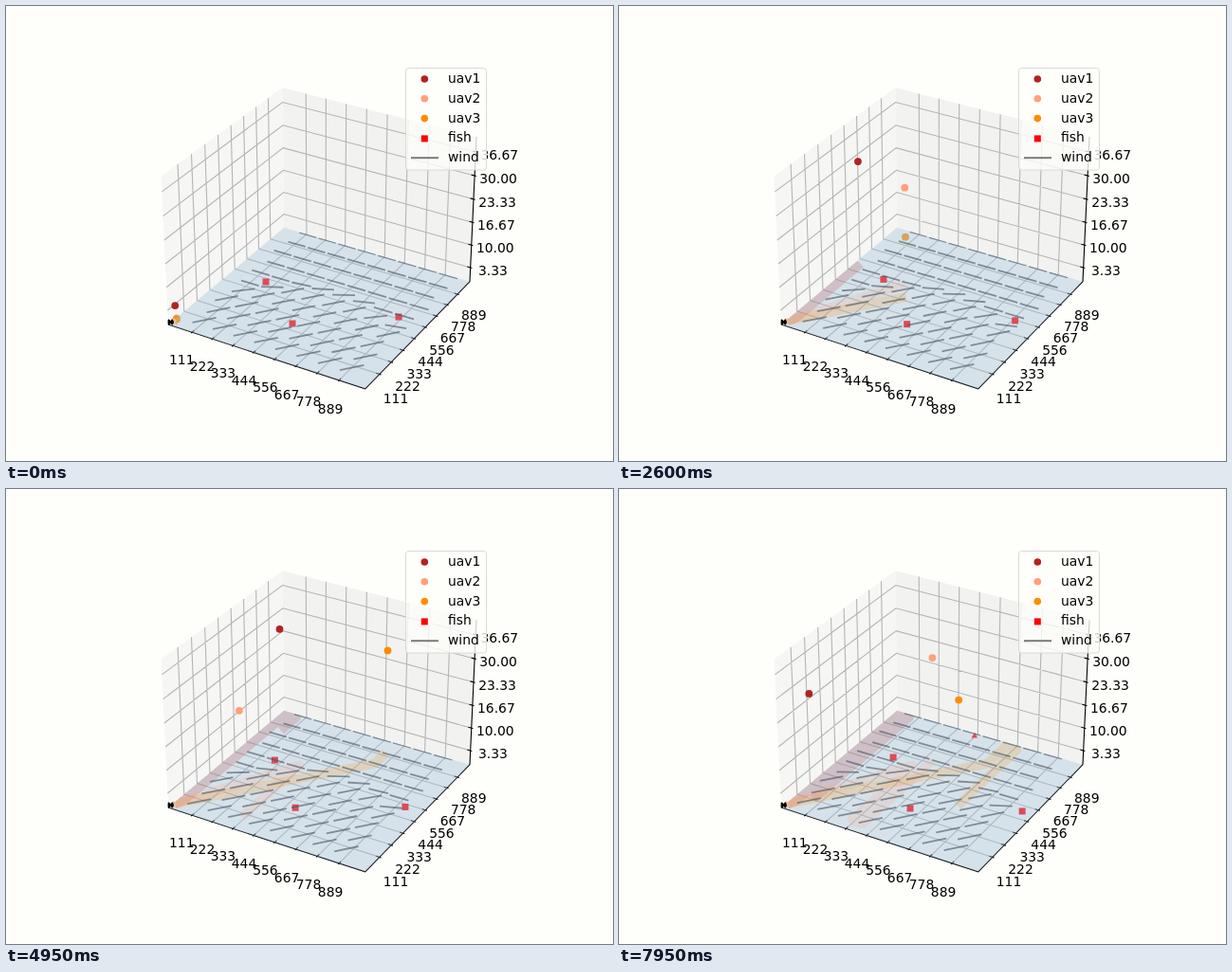
These frames come from a looping animation (640x480 px, 8 s). An HTML page:

```html
<!DOCTYPE html>
<html lang="en">
<head>
<meta charset="utf-8">
<title>Survey flight</title>
<style>
html, body { margin: 0; width: 100%; height: 100%; overflow: hidden; background: #fefefb; }
svg { display: block; width: 640px; height: 480px; }
text { font: 13.89px "DejaVu Sans", sans-serif; fill: #000; }
</style>
</head>
<body>
<svg id="stage" viewBox="0 0 640 480" xmlns="http://www.w3.org/2000/svg"></svg>
<script>
const LOOP = 8000, STEP = 50;
const LO = -1 / 48, HI = 49 / 48;
const SPEED = 0.243, HEIGHT = 0.75, LANE = 0.06, MARGIN = 0.03;

// Each drone climbs to a point on its lane, then sweeps up and down the field
const uavs = [
  { color: '#b22222', x: 0.02, y: 0.047, climb: 0.35, far: true },
  { color: '#ffa07a', x: 0.33, y: 0.589, climb: 2.83, far: false },
  { color: '#ff8c00', x: 0.632, y: 0.778, climb: 4.54, far: true }
];
// Screen position and drift per second
const fish = [
  { x: 274, y: 291, vx: 1.9, vy: -1 },
  { x: 302, y: 335, vx: 0.63, vy: 0.25 },
  { x: 414, y: 328, vx: 1.4, vy: 1.5 }
];

// Perspective view: elevation 30, azimuth -60; data ranges run 0..1
function project(fx, fy, fz) {
  const x = (fx - 0.5) * 8 / 7, y = (fy - 0.5) * 8 / 7, z = (fz - 0.5) * 6 / 7;
  const right = 0.866 * x + 0.5 * y;
  const up = -0.25 * x + 0.433 * y + 0.866 * z;
  const depth = 10 - (0.433 * x - 0.75 * y + 0.5 * z);
  return [333 + 1997.8 * right / depth, 237.4 - 1997.8 * up / depth];
}

const fmt = p => p.map(v => v.toFixed(2)).join(',');
const path3 = (...pts) => 'M' + pts.map(p => fmt(project(...p))).join('L');
const mix = (a, b, k) => a + (b - a) * k;
const clamp = v => Math.min(1, Math.max(0, v));

function flight({ x, y, climb, far }, sec) {
  const k = sec / climb;
  if (k < 1) return [x * k, y * k, HEIGHT * k];
  const end = far ? 1 - MARGIN : MARGIN, dir = far ? 1 : -1;
  const run = Math.abs(end - y), dist = SPEED * (sec - climb);
  const across = Math.min(LANE, Math.max(0, dist - run));
  const back = Math.max(0, dist - run - LANE);
  return [x + across, y + dir * (Math.min(dist, run) - back), HEIGHT];
}

function trackPath(uav, sec) {
  const pts = [];
  for (let s = 0; s < sec; s += 0.1) pts.push(flight(uav, s));
  pts.push(flight(uav, sec));
  return path3(...pts.map(([x, y]) => [x, y, 0]));
}

function windPath(sec) {
  let d = '';
  for (let row = 0; row < 10; row++) {
    const y = 0.03 + row * 0.107;
    const shift = 0.08 + 0.014 * Math.sin(row * 2.4) - 0.0057 * sec;
    for (let col = 0; col < 9; col++) {
      const x = shift + col * 0.112;
      if (x > 0.9) continue;
      const edge = 0.32 + 0.25 * Math.sin(Math.PI * x);
      const calm = clamp((y - edge) / 0.12 + 0.5);
      const angle = mix(0.88, 0.02, calm), len = mix(0.115, 0.098, calm);
      d += path3([x, y, 0], [x + len * Math.cos(angle), y + len * Math.sin(angle), 0]);
    }
  }
  return d;
}

function buildAxes() {
  let grid = '', ticks = '', labels = '';
  const label = (p, dx, dy, s) => {
    labels += `<text x="${(p[0] + dx).toFixed(1)}" y="${(p[1] + dy + 5).toFixed(1)}" text-anchor="middle">${s}</text>`;
  };
  for (let i = 1; i < 9; i++) {
    const f = i / 9, s = Math.round(f * 1000);
    grid += path3([f, LO, LO], [f, HI, LO], [f, HI, HI]);
    grid += path3([HI, f, LO], [LO, f, LO], [LO, f, HI]);
    ticks += path3([f, LO - 0.0083, LO], [f, LO + 0.0167, LO]);
    ticks += path3([HI + 0.0083, f, LO], [HI - 0.0167, f, LO]);
    label(project(f, LO, LO), mix(-11.2, -8.8, f), mix(28.4, 30, f), s);
    label(project(HI, f, LO), 17.2, mix(26, 22, f), s);
  }
  for (let i = 0; i < 6; i++) {
    const f = (i + 0.5) / 6;
    grid += path3([LO, LO, f], [LO, HI, f], [HI, HI, f]);
    ticks += path3([HI + 0.0083, HI, f], [HI - 0.0167, HI, f]);
    label(project(HI, HI, f), i ? 25 : 23.7, 2.7, (f * 40).toFixed(2));
  }
  const axes = path3([LO, LO, LO], [HI, LO, LO], [HI, HI, LO], [HI, HI, HI]);
  return { grid, lines: axes + ticks, labels };
}

function buildLegend() {
  const marks = [
    ...uavs.map(u => y => `<circle cx="441.3" cy="${y}" r="3.8" fill="${u.color}"/>`),
    y => `<rect x="437.8" y="${y - 3}" width="7" height="7" fill="#f00"/>`,
    y => `<path d="M427 ${y}H456" stroke="#7a7a7a" stroke-width="2"/>`
  ];
  const body = ['uav1', 'uav2', 'uav3', 'fish', 'wind'].map((name, i) => {
    const y = 77 + i * 20.8;
    return marks[i](y) + `<text x="466" y="${y + 4}">${name}</text>`;
  }).join('');
  return `<rect x="421.5" y="65.5" width="85" height="107.5" rx="3" fill="#fefefb" fill-opacity=".8" stroke="#d8dcd4"/>` + body;
}

const { grid, lines, labels } = buildAxes();
const floor = path3([LO, LO, LO], [HI, LO, LO], [HI, HI, LO], [LO, HI, LO]) + 'Z';
const leftWall = path3([LO, LO, LO], [LO, HI, LO], [LO, HI, HI], [LO, LO, HI]) + 'Z';
const backWall = path3([LO, HI, LO], [HI, HI, LO], [HI, HI, HI], [LO, HI, HI]) + 'Z';

document.getElementById('stage').innerHTML = `
  <clipPath id="edge"><path d="${floor}"/></clipPath>
  <path d="${leftWall}${floor}" fill="#f6f7f4"/>
  <path d="${backWall}" fill="#f2f3f1"/>
  <path d="${grid}" fill="none" stroke="#b4b4b4" stroke-width="1.1"/>
  <path d="${lines}" fill="none" stroke="#000" stroke-width="1.1"/>
  <g id="uavs">${uavs.map(u => `<circle r="3.9" fill="${u.color}"/>`).join('')}</g>
  <g id="fish">${fish.map(() => '<rect x="-3.5" y="-3.5" width="7" height="7" fill="#f00"/>').join('')}</g>
  <path id="catch" d="M371.5 262.5L375 257L378 262.5Z" fill="#f00"/>
  <path d="${floor}" fill="#a2c0d9" fill-opacity=".4"/>
  <g clip-path="url(#edge)" fill="none">
    <g id="tracks">${uavs.map(u => `<path stroke="${u.color}" stroke-opacity=".18" stroke-width="10" stroke-linejoin="round"/>`).join('')}</g>
    <path id="wind" stroke="#465460" stroke-opacity=".6" stroke-width="1.8"/>
  </g>
  <circle cx="176.5" cy="332.5" r="3" fill="#e8bd98"/>
  <path d="M171 331L176 336M176 331L171 336M170.5 333.5H177" stroke="#000" stroke-width="1.8"/>
  ${labels}
  ${buildLegend()}`;

const [uavEls, fishEls, trackEls] = ['uavs', 'fish', 'tracks'].map(id => [...document.getElementById(id).children]);
const windEl = document.getElementById('wind');
const catchEl = document.getElementById('catch');
const place = (el, p) => el.setAttribute('transform', `translate(${fmt(p)})`);

function draw(t) {
  const sec = t / 1000, flown = (t + STEP) / 1000;
  uavs.forEach((uav, i) => {
    place(uavEls[i], project(...flight(uav, flown)));
    trackEls[i].setAttribute('d', trackPath(uav, flown));
  });
  fish.forEach((f, i) => place(fishEls[i], [f.x + f.vx * sec, f.y + f.vy * sec]));
  windEl.setAttribute('d', windPath(sec));
  catchEl.setAttribute('visibility', t >= 5500 ? 'visible' : 'hidden');
}

const start = performance.now();
function tick() {
  const t = (performance.now() - start) % LOOP;
  draw(Math.floor(t / STEP) * STEP);
  requestAnimationFrame(tick);
}
tick();
</script>
</body>
</html>
```
